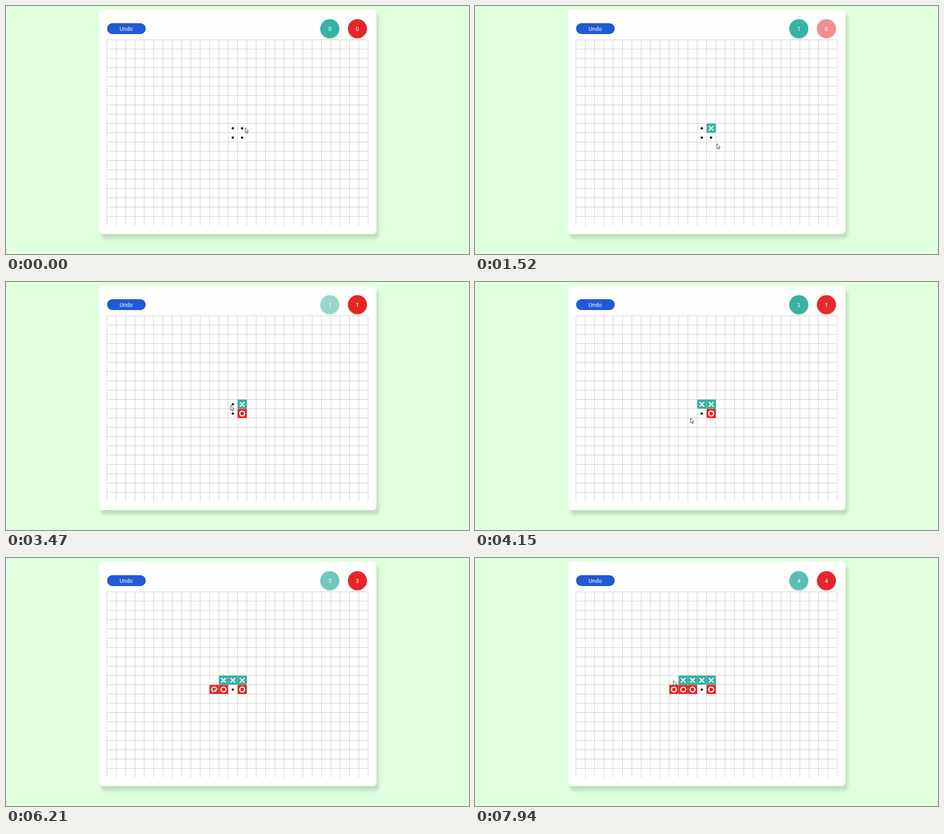
Write an HTML page that moves like this. It is 1021 by 548 pixels and loops after 8000 ms.

```html
<!DOCTYPE html>
<html lang="en">
<head>
<meta charset="utf-8">
<title>Grid game</title>
<style>
  html, body { margin: 0; width: 100%; height: 100%; overflow: hidden; }
  body { position: relative; background: #dfffde; font: 12.5px Roboto, Arial, sans-serif; color: #fff; }
  .card { position: absolute; left: 204.5px; top: 8.3px; width: 612.5px; height: 495.4px;
    border-radius: 8px; background: #fefefd; box-shadow: 5px 10px 7px rgba(0, 0, 0, .14); }
  .undo, .score { position: absolute; display: flex; align-items: center; justify-content: center; }
  .undo { left: 222.5px; top: 38.3px; width: 85px; height: 24px; border-radius: 12px; background: #2159d6; }
  .score { top: 29px; width: 42.4px; height: 42.4px; border-radius: 50%;
    box-shadow: 0 2px 3px rgba(0, 0, 0, .2);
    animation: pulse 2s cubic-bezier(.4, 0, .6, 1) infinite paused; }
  .teal { left: 693px; background: #35b2a2; }
  .red { left: 753.5px; background: #e62529; }
  @keyframes pulse { 50% { opacity: .5; } }
  svg { position: absolute; left: 0; top: 0; width: 1021px; height: 548px; }
</style>
</head>
<body>
<div class="card"></div>
<div class="undo">Undo</div>
<div class="score teal">0</div>
<div class="score red">0</div>
<svg viewBox="0 0 1021 548">
  <path id="grid" fill="none" stroke="#c9c9cc"/>
  <g id="dots"></g>
  <g id="cells"></g>
  <path id="cursor" d="M.5 .5V11.6L3 9.3L4.7 12.9L6.3 12.2L4.7 8.6H7.8Z" fill="#fff" stroke="#222" stroke-width=".9"/>
</svg>
<script>
const LOOP = 8000, LEFT = 222.6, TOP = 74.7, COL = 20.57, ROW = 20.53;
const $ = s => document.querySelector(s);
const scores = [$('.teal'), $('.red')];
const colX = c => LEFT + c * COL;
const rowY = r => TOP + r * ROW;

// X and O alternate, X on row 9 and O on row 10: [time, column]
const moves = [
  [420, 14], [2370, 14], [4000, 13], [5080, 12],
  [5260, 12], [5660, 11], [6480, 11], [7530, 10]
].map(([time, col], i) => ({ time, isO: i % 2, x: colX(col), y: rowY(9 + i % 2) }));

// The pointer visits every cell it plays, with a few detours between
const detours = [
  [420, 527, 268.5], [1520, 533, 303.5], [1980, 488, 306], [2730, 499, 301.3],
  [3000, 491, 274], [4150, 475, 300], [5210, 483, 270.5], [6210, 458.5, 286.5], [7940, 437, 271]
].map(([time, x, y]) => ({ time, x, y }));
const clicks = moves.slice(1).map(m => ({ time: m.time, x: m.x + COL / 2, y: m.y + ROW / 2 }));
const stops = [...detours, ...clicks].sort((a, b) => a.time - b.time);

let lines = '';
for (let c = 0; c <= 28; c++) lines += `M${colX(c)} ${TOP}V485`;
for (let r = 0; r < 20; r++) lines += `M${LEFT} ${rowY(r)}H798.5`;
$('#grid').setAttribute('d', lines);

// Dots in board order: top left, top right, bottom left, bottom right
for (let i = 0; i < 4; i++) {
  const x = colX(13.5 + i % 2) - .2, y = rowY(9.5 + (i >> 1)) + .4;
  $('#dots').innerHTML += `<circle cx="${x}" cy="${y}" r="2.5"/>`;
}
const [dotX2, dotX1, , dotO1] = $('#dots').children;
const playedDots = [dotX1, dotO1, dotX2];

function cell({ isO, x, y }) {
  const mark = isO
    ? '<circle cx="10.1" cy="10.2" r="5.4"/>'
    : '<path d="M5 5.2L15.2 15.4M15.2 5.2L5 15.4"/>';
  return `<g transform="translate(${x + .2} ${y + .4})" fill="none" stroke="#fff" stroke-width="2.6">
    <rect width="20.2" height="20.1" stroke="none" fill="${isO ? '#e62529' : '#35b2a2'}"/>${mark}</g>`;
}
$('#cells').innerHTML = moves.map(cell).join('');
const cells = [...$('#cells').children];

const show = (el, on) => el.setAttribute('visibility', on ? 'visible' : 'hidden');

function pointer(t) {
  const i = stops.findIndex(s => s.time > t);
  if (i === 0) return stops[0];
  if (i < 0) return stops[stops.length - 1];
  const a = stops[i - 1], b = stops[i];
  const k = (t - a.time) / (b.time - a.time), e = k * k * (3 - 2 * k);
  return { x: a.x + (b.x - a.x) * e, y: a.y + (b.y - a.y) * e };
}

function render(t) {
  const done = moves.filter(m => m.time <= t).length;
  cells.forEach((c, i) => show(c, i < done));
  playedDots.forEach((d, i) => show(d, i >= done));

  // The player to move pulses, counted from the other player's move
  scores.forEach((s, i) => {
    const active = done > 0 && done % 2 === i;
    s.textContent = Math.floor((done + 1 - i) / 2);
    s.style.animationDelay = active ? `${moves[done - 1].time - t}ms` : '0ms';
  });

  const { x, y } = pointer(t);
  $('#cursor').setAttribute('transform', `translate(${x} ${y})`);
}

const start = performance.now();
function frame() {
  render((performance.now() - start) % LOOP);
  requestAnimationFrame(frame);
}
frame();
</script>
</body>
</html>
```
